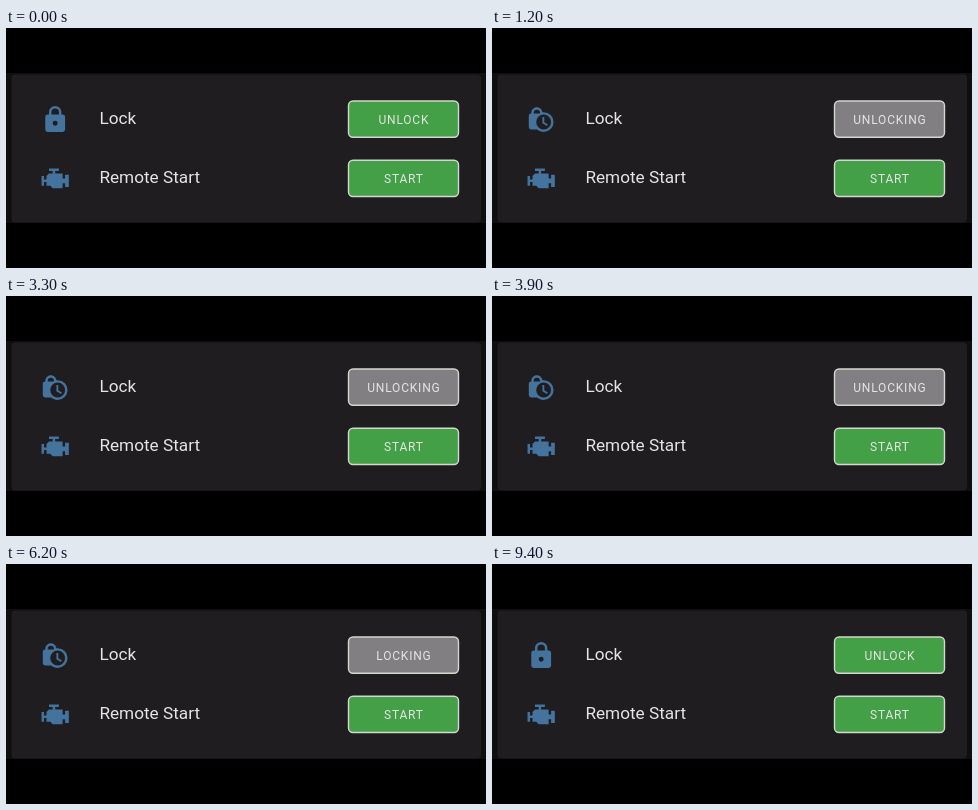
Write an HTML page that moves like this. It is 480 px wide and 240 px high and loops after 10 s.

```html
<!DOCTYPE html>
<html lang="en">
<head>
<meta charset="utf-8">
<title>Lock and remote start</title>
<style>
  html, body { margin: 0; width: 100%; height: 100%; overflow: hidden; background: #000; }
  svg { display: block; width: 480px; height: 240px; }
  text { font-family: Roboto, sans-serif; fill: #e3e4e3; }
  .label { font-size: 17.2px; }
  .button rect { stroke: #d2d8cd; stroke-width: 1.4px; }
  .button text { font-size: 12px; letter-spacing: .8px; text-anchor: middle; }
</style>
</head>
<body>
<svg viewBox="0 0 480 240">
  <rect y="45" width="480" height="150" fill="#0f0f0f"/>
  <rect x="5.5" y="46.5" width="469.5" height="148" rx="4" fill="#1f1d20"/>

  <path id="icon" transform="translate(34.3 76.7) scale(1.24)"/>
  <text class="label" x="93.4" y="96.4">Lock</text>
  <g class="button">
    <rect id="face" x="342.5" y="73" width="110" height="36.3" rx="4.5"/>
    <text id="caption" x="397.9" y="95.8"></text>
  </g>

  <path transform="translate(34.3 135.5) scale(1.24)" fill="#44739e"
    d="M7 4V6H10V8H7L5 10V13H3V10H1V18H3V15H5V18H8L10 20H18V16H20V19H23V9H20V12H18V8H12V6H15V4Z"/>
  <text class="label" x="93.4" y="155.4">Remote Start</text>
  <g class="button">
    <rect x="342.5" y="132.2" width="110" height="36.3" rx="4.5" fill="#43a047"/>
    <text x="397.9" y="154.9">START</text>
  </g>
</svg>
<script>
const LOOP = 10000;
const blue = '#44739e', yellow = '#fdd835';
const green = '#43a047', gray = '#817f82', red = '#ff0000';

const keyhole = 'M12 17A2 2 0 0 0 14 15A2 2 0 0 0 10 15A2 2 0 0 0 12 17Z';
const body = 'M18 8A2 2 0 0 1 20 10V20A2 2 0 0 1 18 22H6A2 2 0 0 1 4 20V10A2 2 0 0 1 6 8';
const closed = body + 'H7V6A5 5 0 0 1 17 6V8ZM12 3A3 3 0 0 0 9 6V8H15V6A3 3 0 0 0 12 3Z' + keyhole;
const opened = body + 'H15V6A3 3 0 0 0 9 6H7A5 5 0 0 1 17 6V8Z' + keyhole;
const waiting = 'M8.5 2C6 2 4 4 4 6.5V7A2 2 0 0 0 2 9V18A2 2 0 0 0 4 20H8.72' +
  'C10.18 21.29 12.06 22 14 22A8 8 0 0 0 14 6C13.66 6 13.32 6.03 13 6.08C12.76 3.77 10.82 2 8.5 2' +
  'M8.5 4A2.5 2.5 0 0 1 11 6.5V7H6V6.5A2.5 2.5 0 0 1 8.5 4' +
  'M14 8A6 6 0 0 1 14 20A6 6 0 0 1 14 8' +
  'M13 10V15L16.64 17.19L17.42 15.9L14.5 14.15V10Z';

// start time, caption, button colour, icon path, icon colour
const states = [
  [0, 'UNLOCK', green, closed, blue],
  [1200, 'UNLOCKING', gray, waiting, blue],
  [4500, 'LOCK', red, opened, yellow],
  [5600, 'LOCKING', gray, waiting, blue],
  [7100, 'UNLOCK', green, closed, blue]
];

const [icon, face, caption] = ['icon', 'face', 'caption'].map(id => document.getElementById(id));
icon.setAttribute('fill-rule', 'evenodd');
const origin = performance.now();
let shown;

function draw(now) {
  const t = Math.max(0, now - origin) % LOOP;
  const state = states.findLast(s => s[0] <= t);
  if (state !== shown) {
    shown = state;
    const [, text, color, path, tint] = state;
    caption.textContent = text;
    face.setAttribute('fill', color);
    icon.setAttribute('d', path);
    icon.setAttribute('fill', tint);
  }
  requestAnimationFrame(draw);
}
draw(origin);
</script>
</body>
</html>
```
